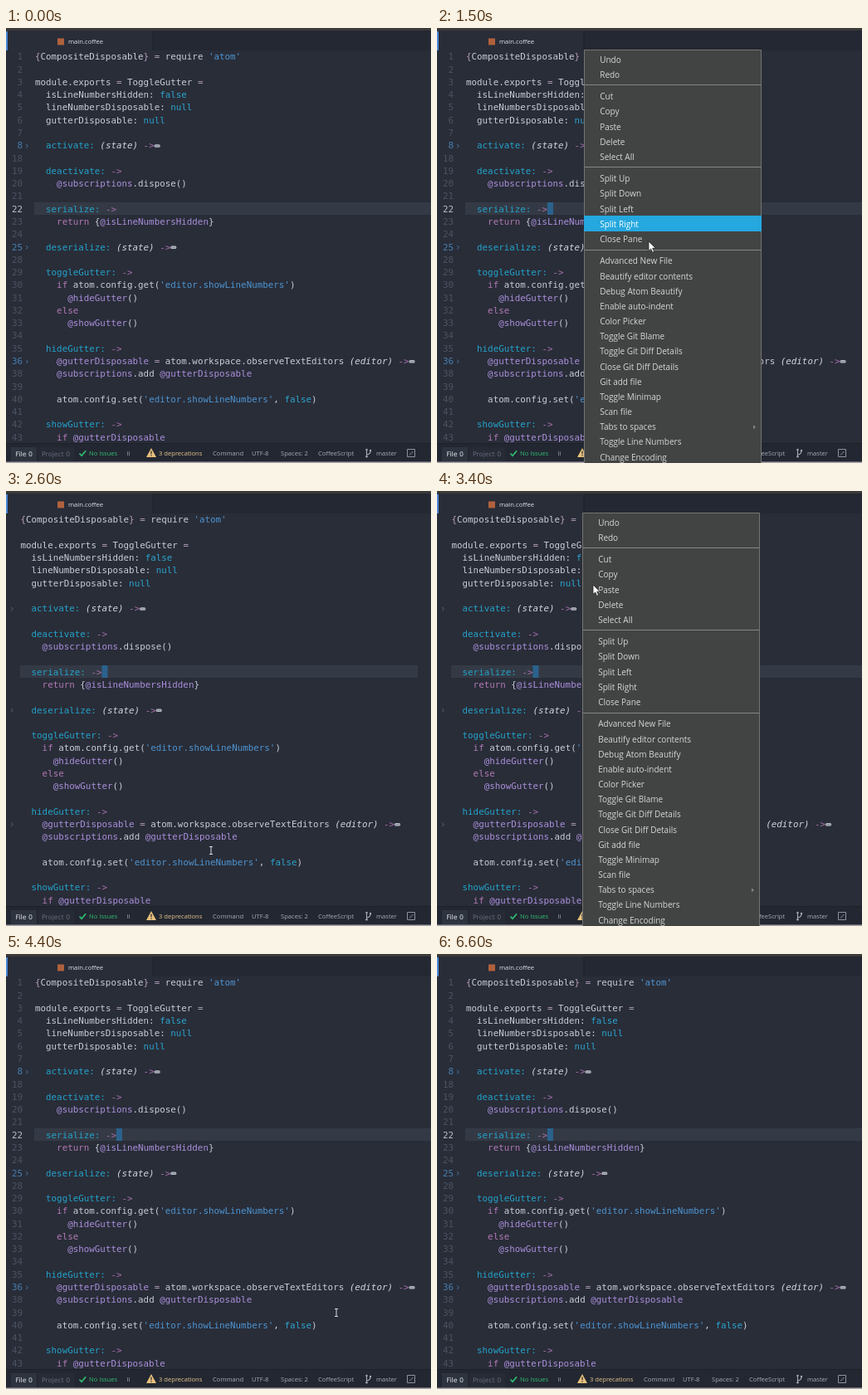
These frames come from a looping animation (512 px wide and 524 px high, 6700 ms). An HTML page with a canvas:

```html
<!DOCTYPE html>
<html>
<head>
<meta charset="utf-8">
<style>
  html, body { margin: 0; height: 100%; overflow: hidden; background: #292d38; }
  canvas { display: block; }
</style>
</head>
<body>
<canvas id="stage" width="512" height="524"></canvas>
<script>
const ctx = document.getElementById('stage').getContext('2d');
const LOOP = 6700, STEP = 100;
const CHAR = 6.53, ROW = 15.28, FIRST_ROW = 34.4;
const MONO = '10.85px "DejaVu Sans Mono", monospace';
const SANS = '"Open Sans", "Noto Sans", sans-serif';

const code = `{CompositeDisposable} = require 'atom'

module.exports = ToggleGutter =
  isLineNumbersHidden: false
  lineNumbersDisposable: null
  gutterDisposable: null

  activate: (state) ->…

  deactivate: ->
    @subscriptions.dispose()

  serialize: ->
    return {@isLineNumbersHidden}

  deserialize: (state) ->…

  toggleGutter: ->
    if atom.config.get('editor.showLineNumbers')
      @hideGutter()
    else
      @showGutter()

  hideGutter: ->
    @gutterDisposable = atom.workspace.observeTextEditors (editor) ->…
    @subscriptions.add @gutterDisposable

    atom.config.set('editor.showLineNumbers', false)

  showGutter: ->
    if @gutterDisposable`.split('\n');

// Last hidden line of each folded block
const folds = { 8: 17, 25: 27, 36: 37 };
const ACTIVE_ROW = 12;

const menuGroups = [
  ['Undo', 'Redo'],
  ['Cut', 'Copy', 'Paste', 'Delete', 'Select All'],
  ['Split Up', 'Split Down', 'Split Left', 'Split Right', 'Close Pane'],
  ['Advanced New File', 'Beautify editor contents', 'Debug Atom Beautify',
    'Enable auto-indent', 'Color Picker', 'Toggle Git Blame',
    'Toggle Git Diff Details', 'Close Git Diff Details', 'Git add file',
    'Toggle Minimap', 'Scan file', 'Tabs to spaces', 'Toggle Line Numbers',
    'Change Encoding']
];

// Token patterns, matched in order: [regex, colour, italic]
const syntax = [
  [/'[^']*'/y, '#4d95d3'],
  [/@\w+/y, '#ab8fdc'],
  [/(if|else|return)\b/y, '#b279b4'],
  [/->/y, '#a870ac'],
  [/\} =|=|^\{/y, '#b5a0bd'],
  [/(false|null)\b/y, '#2ba5cf'],
  [/\w+:(?= (->|\())/y, '#23a3cb'],
  [/\(\w+\)(?= ->)/y, '#d3d6df', true],
  [/\w+:?|\s+|./y, '#c9cdd8']
];

// Pointer path: [time, x, y]
const path = [
  [400, 340, 540], [900, 178, 47], [1000, 178, 26], [1200, 200, 90],
  [1400, 247, 236], [1500, 255, 257], [1700, 258, 360], [2100, 250, 498],
  [2300, 249, 495], [2600, 247, 433], [2900, 236, 330], [3300, 176, 26],
  [3500, 200, 200], [3700, 233, 389], [3800, 239, 438], [4100, 252, 498],
  [4200, 262, 496], [4400, 398, 432], [4900, 470, -30], [LOOP, 470, -30]
];
const menus = [{ open: 1100, close: 2300, x: 178 }, { open: 3400, close: 4300, x: 176 }];

function pointerAt(t) {
  if (t <= path[0][0]) return path[0].slice(1);
  const i = path.findIndex(p => p[0] >= t);
  const [t0, x0, y0] = path[i - 1], [t1, x1, y1] = path[i];
  const k = (t - t0) / (t1 - t0);
  return [x0 + (x1 - x0) * k, y0 + (y1 - y0) * k];
}

function rect(x, y, w, h, color) {
  ctx.fillStyle = color;
  ctx.fillRect(x, y, w, h);
}

function text(str, x, y, color, font, align = 'left') {
  ctx.font = font;
  ctx.fillStyle = color;
  ctx.textAlign = align;
  ctx.fillText(str, x, y);
}

function stroke(d, color, width = 1) {
  ctx.strokeStyle = color;
  ctx.lineWidth = width;
  ctx.stroke(new Path2D(d));
}

function fill(d, color) {
  ctx.fillStyle = color;
  ctx.fill(new Path2D(d));
}

function drawFoldMark(x, y) {
  ctx.fillStyle = '#b9bdc7';
  ctx.beginPath();
  ctx.roundRect(x, y - 1, 7, 3.5, 1.5);
  ctx.fill();
  for (let i = 0; i < 3; i++) rect(x + 1.3 + i * 1.8, y + 0.2, 0.9, 1, '#4a4e5a');
}

function drawLine(line, x, y) {
  let col = 0;
  while (col < line.length) {
    for (const [pattern, color, italic] of syntax) {
      pattern.lastIndex = col;
      const match = pattern.exec(line);
      if (!match) continue;
      const left = x + col * CHAR;
      if (match[0] === '…') drawFoldMark(left, y);
      else text(match[0], left, y + 3.9, color, (italic ? 'italic ' : '') + MONO);
      col += match[0].length;
      break;
    }
  }
}

function drawEditor(t) {
  const hidden = t >= 2400 && t < 4300;
  const left = hidden ? 17.5 : 35;
  const activeTop = Math.round(FIRST_ROW + ACTIVE_ROW * ROW - 7.6);
  const right = t >= 2400 && t < 2900 ? 496 : 512;
  const bandLeft = Math.floor(left) - (hidden ? 0 : 1);
  rect(bandLeft, activeTop, right - bandLeft, 15, '#343a45');
  if (t >= 100) rect(left + 15 * CHAR, activeTop, 7, 15, '#2b628d');

  let number = 1;
  code.forEach((line, row) => {
    const y = FIRST_ROW + row * ROW;
    const folded = folds[number];
    if (!hidden) {
      const color = row === ACTIVE_ROW ? '#b9bfca' : folded ? '#477fb0' : '#4b5362';
      text(number, 20, y + 3.9, color, MONO, 'right');
    }
    if (folded) {
      const x = hidden ? 6 : 24;
      stroke(`M${x} ${y - 1.5}l2.4 2.2l-2.4 2.2`, hidden ? '#566070' : '#4573a0');
    }
    drawLine(line, left, y);
    number = (folded || number) + 1;
  });
}

function drawTabs() {
  rect(0, 0, 512, 3, '#3b3b38');
  rect(177, 3, 335, 24, '#242832');
  rect(0, 4, 2, 23, '#4b86d8');
  rect(176.5, 4, 1, 23, '#1d2029');
  rect(62, 12.5, 8, 8, '#b0613c');
  text('main.coffee', 75, 19, '#dfe2e8', '7.65px ' + SANS);
}

function drawStatus() {
  const font = '7.6px ' + SANS, tabFont = '7.85px "DejaVu Sans", sans-serif';
  const label = (str, x, color = '#a6acb8') => text(str, x, 515, color, font);
  rect(0, 500.5, 512, 22, '#232731');
  rect(0, 500, 512, 1, '#1d2029');
  rect(6, 505, 31, 17, '#2e343f');
  rect(39, 505, 43, 17, '#272b36');
  text('File 0', 11.5, 516, '#dfe2e8', tabFont);
  text('Project 0', 43, 516, '#636b7a', tabFont);
  stroke('M88.5 512.5l2.6 2.8l5 -6', '#2fbf72', 1.7);
  label('No Issues', 100, '#2fbf72');
  label('li', 145.5);
  fill('M175 506l6 11h-12z', '#e8c17c');
  rect(174.4, 509.5, 1.2, 3.8, '#232731');
  rect(174.4, 514.3, 1.2, 1.3, '#232731');
  label('3 deprecations', 184, '#e8c68e');
  label('Command', 249);
  label('UTF-8', 296);
  label('Spaces: 2', 331);
  label('CoffeeScript', 376);
  stroke('M434.5 508v8M434.5 514q4.500 -.5 4.500 -4.500', '#a6acb8', 1.1);
  for (const [x, y] of [[434.5, 508], [434.5, 516.3], [439, 509]]) {
    ctx.beginPath();
    ctx.arc(x, y, 1.2, 0, 7);
    ctx.fillStyle = '#a6acb8';
    ctx.fill();
  }
  label('master', 446);
  stroke('M483.500 507.500h9v9h-9zM486 514.500l4.500 -4.500', '#8b92a0');
  rect(0, 522.5, 512, 1.5, '#aaa5ad');
}

function drawMenu(x, hoverY) {
  const left = x - 1, width = 214;
  rect(left, 26, width, 500, '#424443');
  stroke(`M${left + 0.5} 524V26.500h${width - 1}V524`, '#737473');
  let y = 38;
  menuGroups.forEach((group, i) => {
    if (i) {
      rect(left + 1, Math.round(y - 6), width - 2, 1, '#858685');
      y += 8.25;
    }
    for (const item of group) {
      const active = Math.abs(hoverY - y) < 9.08;
      if (active) rect(left, Math.round(y - 9.8), width, 19, '#25a8df');
      text(item, x + 18.2, y + 3.6, active ? '#ffffff' : '#d5d6d4', '10px ' + SANS);
      if (item === 'Tabs to spaces') fill(`M${x + 203} ${y - 2.5}l3 2.5l-3 2.5z`, '#838483');
      y += 18.17;
    }
  });
}

function drawPointer(x, y, arrow) {
  if (arrow) {
    const d = `M${x} ${y}v11.500l2.700 -2.500l1.900 4.300l2 -.9l-1.900 -4.200h3.700z`;
    fill(d, '#ffffff');
    stroke(d, '#22221f', 0.8);
  } else {
    stroke(`M${x - 2} ${y - 4.5}h4M${x} ${y - 4.5}v9M${x - 2} ${y + 4.5}h4`, '#d8dade');
  }
}

function draw(t) {
  rect(0, 0, 512, 524, '#292d38');
  drawTabs();
  drawEditor(t);
  drawStatus();
  const menu = menus.find(m => t >= m.open && t < m.close);
  if (menu) drawMenu(menu.x, pointerAt(t - STEP)[1]);
  drawPointer(...pointerAt(t), menu);
}

function frame() {
  draw(Math.floor(performance.now() % LOOP / STEP) * STEP);
  requestAnimationFrame(frame);
}
frame();
</script>
</body>
</html>
```
